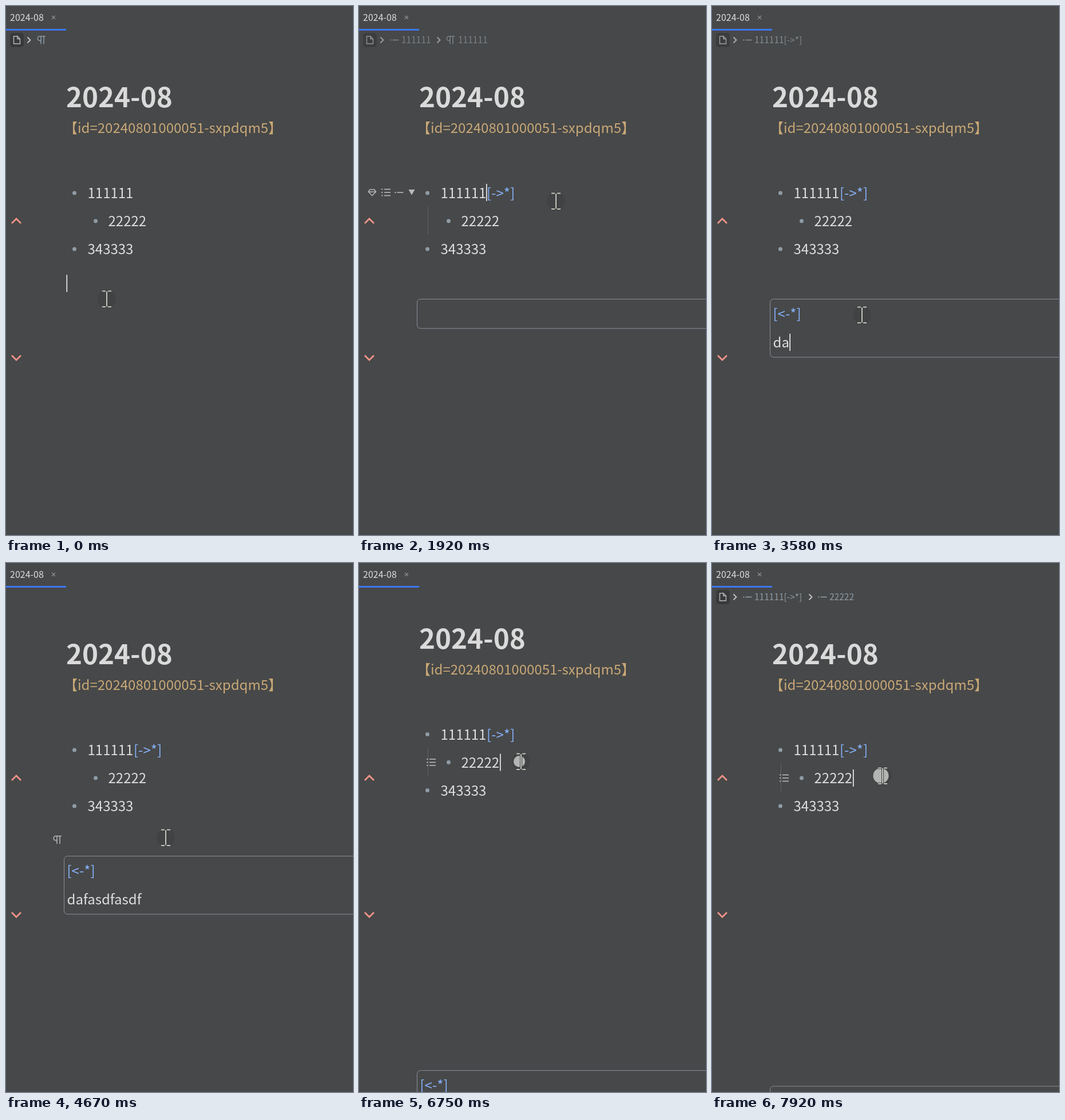
An HTML page with a canvas for the animation above (8000 ms loop, 606 px wide and 925 px high).

```html
<!DOCTYPE html>
<html lang="en">
<head>
<meta charset="utf-8">
<title>Block reference demo</title>
<style>
html, body { margin: 0; height: 100%; overflow: hidden; background: #474849; }
canvas { display: block; }
</style>
</head>
<body>
<canvas id="stage" width="606" height="925"></canvas>
<script>
const ctx = document.getElementById('stage').getContext('2d');
const LOOP = 8000, LINE = 50.3, SCROLL = 27.5;
const FONT = '"Noto Sans CJK SC", "Noto Sans", sans-serif';
const INK = '#dedede', BLUE = '#86b2fb', SOFT = '#b9babb', CRUMB = '#8f9ca6';
const TYPED = 'dafasdfasdf', FWD = '[->*]', BACK = '[<-*]';

// [time, value...] keys
const CRUMB_FADE = [[0, 1], [1600, 1], [1920, .7], [2300, 0], [2600, 0], [2750, 1], [3350, 1], [4200, 0],
  [4700, 0], [4800, 1], [5100, 1], [5640, .12], [6120, 0], [6920, 0], [7080, 1]];
const POINTER = [[80, 176, 512], [700, 344, 341], [2420, 344, 341], [2800, 262, 540],
  [4400, 262, 540], [4620, 279, 480], [6080, 279, 480], [6400, 290, 400], [6640, 283, 347],
  [6950, 283, 347], [7600, 298, 372]];
const SCROLLING = [[5970, 0], [6000, SCROLL], [7080, SCROLL], [7420, 0]];
const ENTERS = [5080, 5330, 5500, 5580, 5750, 5830, 5910, 5970];
const CLICKS = [750, 2840, 4750, 6670, 7750];

function at(keys, t) {
  const i = keys.findIndex(k => k[0] > t);
  if (i === 0) return keys[0].slice(1);
  if (i < 0) return keys[keys.length - 1].slice(1);
  const a = keys[i - 1], b = keys[i];
  const p = (t - a[0]) / (b[0] - a[0]), e = p * p * (3 - 2 * p);
  return a.slice(1).map((v, n) => v + (b[n + 1] - v) * e);
}

function text(s, x, y, size, color, weight = 400) {
  ctx.font = `${weight} ${size}px ${FONT}`;
  ctx.fillStyle = color;
  ctx.fillText(s, x, y);
  return x + ctx.measureText(s).width;
}

function line(color, width, ...pts) {
  ctx.strokeStyle = color;
  ctx.lineWidth = width;
  ctx.beginPath();
  for (let i = 0; i < pts.length; i += 2) ctx.lineTo(pts[i], pts[i + 1]);
  ctx.stroke();
}

function dot(x, y, r, color) {
  ctx.fillStyle = color;
  ctx.beginPath();
  ctx.arc(x, y, r, 0, 7);
  ctx.fill();
}

function pilcrow(x, y, color) {
  ctx.strokeStyle = color;
  ctx.lineWidth = 1.5;
  ctx.beginPath();
  ctx.moveTo(x + 7, y - 6.5);
  ctx.lineTo(x - 3, y - 6.5);
  ctx.arc(x - 3, y - 2.7, 3.8, -Math.PI / 2, Math.PI / 2, true);
  ctx.lineTo(x - 1, y + 1.1);
  ctx.moveTo(x - 1, y - 6.5);
  ctx.lineTo(x - 1, y + 7);
  ctx.moveTo(x + 4, y - 6.5);
  ctx.lineTo(x + 4, y + 7);
  ctx.stroke();
}

function listIcon(x, y) {
  for (const d of [-5.5, 0, 5.5]) {
    line(SOFT, 1.6, x - 8, y + d, x - 5.5, y + d);
    line(SOFT, 1.6, x - 3, y + d, x + 8, y + d);
  }
}

function itemIcon(x, y, color) {
  line(color, 1.6, x - 8, y, x - 5.5, y);
  line(color, 1.6, x - 3.5, y, x + 7.5, y);
}

function gem(x, y) {
  line(SOFT, 1.5, x - 4, y - 5, x + 4, y - 5, x + 6.5, y - 1, x, y + 5.5, x - 6.5, y - 1, x - 4, y - 5);
  line(SOFT, 1.5, x - 6.5, y - 1, x + 6.5, y - 1);
}

function caret(x, y) {
  ctx.fillStyle = '#f2f2f2';
  ctx.fillRect(x - .5, y - 15, 1.6, 30);
}

function crumbs(t) {
  ctx.globalAlpha = at(CRUMB_FADE, t)[0];
  ctx.fillStyle = '#38393a';
  ctx.beginPath();
  ctx.roundRect(7, 47, 24, 25, 5);
  ctx.fill();
  line(SOFT, 1.4, 20, 53, 13.5, 53, 13.5, 66, 24.5, 66, 24.5, 57.5, 20, 53, 20, 57.5, 24.5, 57.5);
  const sep = x => line('#c4c6c8', 1.8, x - 2.5, 54.5, x + 2.5, 59.5, x - 2.5, 64.5);
  const item = (x, s) => {
    itemIcon(x + 8, 59.5, CRUMB);
    text(s, x + 20, 65, 15.5, CRUMB);
  };
  sep(40);
  if (t < 750 || (t >= 4750 && t < 6670)) {
    pilcrow(62, 59.5, CRUMB);
  } else if (t < 2350) {
    item(54, '111111');
    sep(139);
    pilcrow(160, 59.5, CRUMB);
    text('111111', 173, 65, 15.5, CRUMB);
  } else {
    item(54, '111111' + FWD);
    if (t >= 6670) {
      sep(172);
      item(185, '22222');
    }
  }
  ctx.globalAlpha = 1;
}

function block(t, y) {
  const rows = t >= 3420 ? 2 : 1;
  ctx.beginPath();
  ctx.roundRect(101.5, y + .5, 530, 1 + LINE * rows, 6);
  if (t >= 2080 && t < 3420) {
    ctx.fillStyle = '#434f70';
    ctx.fill();
  }
  ctx.strokeStyle = '#8b8e9b';
  ctx.lineWidth = 1;
  ctx.stroke();
  if (t < 2080) return;
  const end = text(BACK, 106.5, y + 35, 24, BLUE);
  if (rows === 1) {
    caret(end, y + 26);
    return;
  }
  const count = Math.max(0, Math.min(TYPED.length, Math.floor((t - 3420) / 70)));
  const tail = text(TYPED.slice(0, count), 106.5, y + 85, 24, INK);
  if (t < 4420) caret(tail + 1, y + 76);
}

function page(t) {
  const linked = t >= 1660, enters = ENTERS.filter(e => t >= e).length;
  text('2024-08', 105, 177, 47.5, '#dadada', 700);
  text('【id=20240801000051-sxpdqm5】', 101, 222, 24, '#c8a876');

  dot(119.5, 327, 3.5, '#8e9ba6');
  dot(156.5, 376, 3.5, '#8e9ba6');
  dot(119.5, 425, 3.5, '#8e9ba6');
  text('111111', 142.5, 336, 24, INK);
  text('22222', 178.5, 385, 24, INK);
  text('343333', 142.5, 434, 24, INK);
  if (linked) text(FWD, 223, 336, 24, BLUE);

  const first = t >= 750 && t < 2080, nested = t >= 6670;
  if (first || nested) line('#606263', 1, 120.5, 351, 120.5, 399);
  if (t < 750) caret(106, 485);
  if (first) caret(222.5, 326);
  if (t >= 4750 && !nested) caret(106, 485 + enters * LINE);
  if (nested) caret(246.5, 376);

  // gutter icons follow the hovered block
  if (t >= 600 && t < 2080) {
    gem(23, 326);
    listIcon(47, 326);
    itemIcon(70, 326, SOFT);
    ctx.fillStyle = SOFT;
    ctx.beginPath();
    ctx.moveTo(86.5, 321);
    ctx.lineTo(97.5, 321);
    ctx.lineTo(92, 330.5);
    ctx.fill();
  }
  if (t >= 2750 && t < 3420) gem(90.5, 538);
  if (t >= 4560 && t < 6160) pilcrow(90, 484, SOFT);
  if (t >= 6500) listIcon(126, 376);

  if (linked) block(t, 512 + enters * LINE);
}

function pointer(t) {
  const [x, y] = at(POINTER, t);
  dot(x, y, 16, 'rgba(30,30,34,.13)');
  const click = CLICKS.find(c => t >= c && t < c + 330);
  if (click !== undefined) {
    const age = t - click;
    ctx.globalAlpha = Math.min(1, (330 - age) / 100);
    dot(x - 3, y, Math.min(13.5, 4 + age * .075), '#b3b4b4');
    ctx.globalAlpha = 1;
  }
  const beam = (color, w) => {
    line(color, w, x, y - 13, x, y + 13.5);
    for (const d of [-13.5, 14]) {
      line(color, w, x - 8, y + d, x - 2, y + d);
      line(color, w, x + 2, y + d, x + 8, y + d);
    }
  };
  beam('#3d3e40', 4);
  beam('#c6c6bd', 2);
}

function draw(now) {
  const t = now % LOOP;
  ctx.fillStyle = '#474849';
  ctx.fillRect(0, 0, 606, 925);

  ctx.save();
  ctx.translate(0, -at(SCROLLING, t)[0]);
  page(t);
  ctx.restore();

  text('2024-08', 7, 26, 16, INK);
  line('#929394', 1.1, 80, 17, 86, 23);
  line('#929394', 1.1, 86, 17, 80, 23);
  ctx.fillStyle = '#3b78ee';
  ctx.fillRect(0, 40, 105, 3);
  crumbs(t);
  line('#f29488', 2.8, 10, 380, 18, 372, 26, 380);
  line('#f29488', 2.8, 10, 611, 18, 619, 26, 611);
  pointer(t);
}

const start = performance.now();
function tick() {
  draw(performance.now() - start);
  requestAnimationFrame(tick);
}
tick();
</script>
</body>
</html>
```
